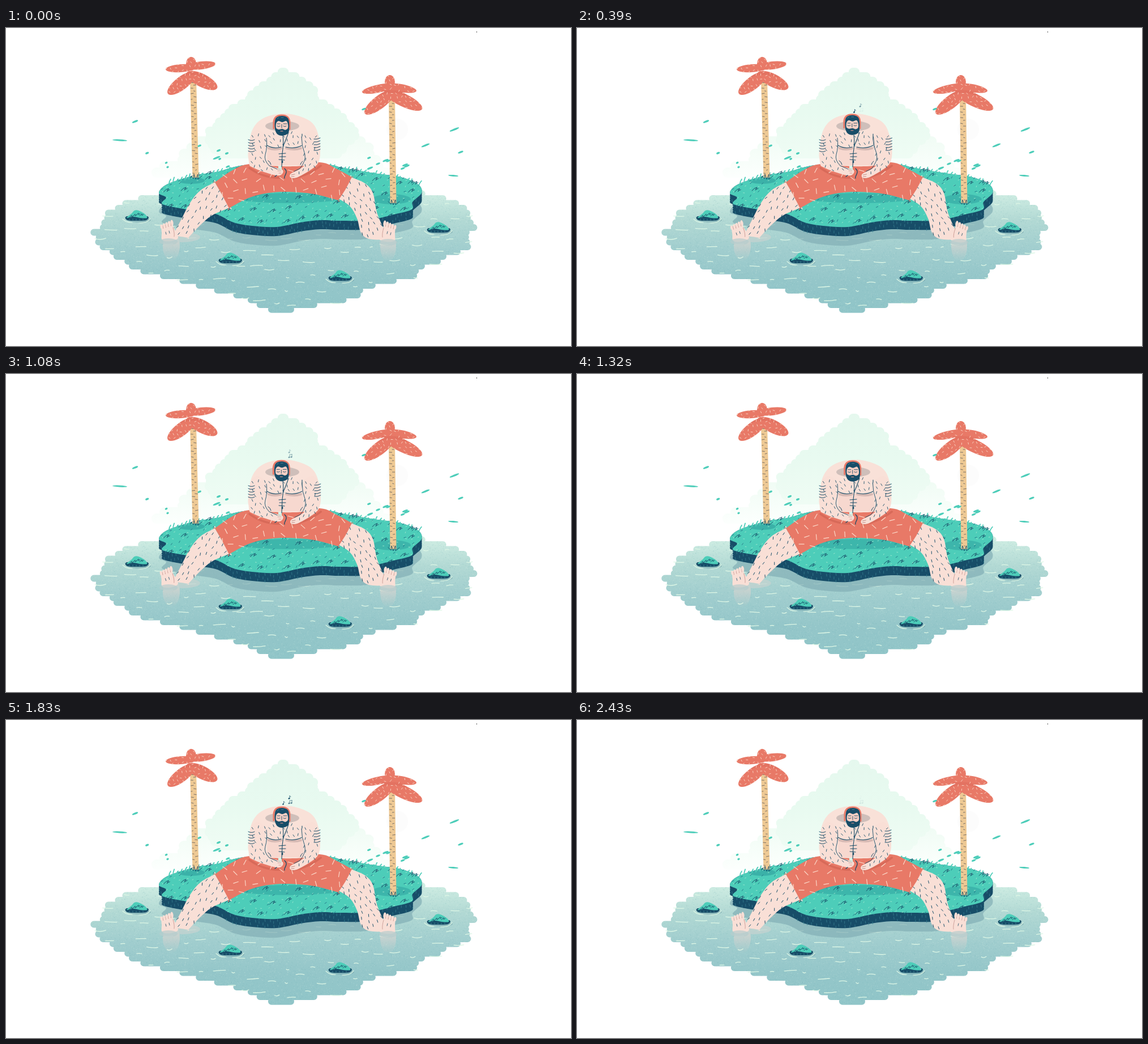
Write an HTML page with a canvas that moves like this. It is 998 px wide and 561 px high and loops after 2460 ms.

```html
<!DOCTYPE html>
<html lang="en">
<head>
<meta charset="utf-8">
<title>Island beat</title>
<style>
  html, body { margin: 0; width: 100%; height: 100%; overflow: hidden; background: #fff; }
  canvas { display: block; width: 998px; height: 561px; }
</style>
</head>
<body>
<canvas id="stage" width="998" height="561"></canvas>
<script>
const LOOP = 2460, STEP = 30, BEAT = LOOP / 4, SONG = LOOP / 2;
const NAVY = '#174d68', GREEN = '#4dcdb9', CORAL = '#e87967', SKIN = '#f9dfd6', FOAM = '#dcf6e5';
const stage = document.getElementById('stage');
const c = stage.getContext('2d');
c.lineCap = c.lineJoin = 'round';

let seed = 7;
const rand = (a = 0, b = 1) => {
  seed = (seed * 1664525 + 1013904223) >>> 0;
  return a + (b - a) * seed / 4294967296;
};
const mix = (a, b, k) => a + (b - a) * k;
const fill = (path, color) => { c.fillStyle = color; c.fill(path); };
const line = (path, color = NAVY, width = 1.1) => {
  c.strokeStyle = color;
  c.lineWidth = width;
  c.stroke(typeof path === 'string' ? new Path2D(path) : path);
};
const ellipse = (x, y, rx, ry, angle = 0) => {
  const p = new Path2D();
  p.ellipse(x, y, rx, ry, angle, 0, 7);
  return p;
};
const oval = (x, y, rx, ry, color, angle) => fill(ellipse(x, y, rx, ry, angle), color);
const fade = (y0, y1, ...colors) => {
  const g = c.createLinearGradient(0, y0, 0, y1);
  colors.forEach((color, i) => g.addColorStop(i / (colors.length - 1), color));
  return g;
};
const inside = (path, draw) => {
  c.save();
  c.clip(path);
  draw();
  c.restore();
};

// Closed spline through the points; a repeated point makes a corner.
const soft = text => {
  const pts = text.split(' ').map(s => s.split(',').map(Number)), n = pts.length;
  const p = new Path2D();
  p.moveTo(...pts[0]);
  pts.forEach((b, i) => {
    const a = pts[(i + n - 1) % n], d = pts[(i + 1) % n], e = pts[(i + 2) % n];
    p.bezierCurveTo(b[0] + (d[0] - a[0]) / 6, b[1] + (d[1] - a[1]) / 6,
      d[0] - (e[0] - b[0]) / 6, d[1] - (e[1] - b[1]) / 6, ...d);
  });
  return p;
};

// Stack of round-ended bars between key rows [y, left, right].
const bars = (keys, step, size, wobble) => {
  const p = new Path2D();
  for (let y = keys[0][0], i = 0; y <= keys.at(-1)[0]; y += step) {
    while (y > keys[i + 1][0]) i++;
    const [a, b] = [keys[i], keys[i + 1]], k = (y - a[0]) / (b[0] - a[0]);
    const left = mix(a[1], b[1], k) + rand(-.3, 1) * wobble, right = mix(a[2], b[2], k) - rand(-.3, 1) * wobble;
    p.roundRect(left, y - size / 2, right - left, size, size / 2);
  }
  return p;
};

// Marks spread evenly over an area, at least a gap apart.
const scatter = (area, [x0, y0, x1, y1], gap, mark) => {
  const path = new Path2D(), seen = [];
  for (let i = 0; i < 2500; i++) {
    const x = rand(x0, x1), y = rand(y0, y1);
    if (!c.isPointInPath(area, x, y) || seen.some(s => Math.hypot(s[0] - x, s[1] - y) < gap)) continue;
    seen.push([x, y]);
    mark(path, x, y);
  }
  return path;
};
const dash = (length, angle, spread) => (p, x, y) => {
  const a = angle + rand(-spread, spread), dx = Math.cos(a) * length / 2, dy = Math.sin(a) * length / 2;
  p.moveTo(x - dx, y - dy);
  p.lineTo(x + dx, y + dy);
};
const ripple = (p, x, y) => {
  const r = rand(2, 11);
  p.moveTo(x - r, y);
  p.quadraticCurveTo(x, y + rand(-2, 3), x + r, y + rand(-1.5, 1));
};
const tuft = (p, x, y) => {
  p.moveTo(x - 5, y + 3);
  p.quadraticCurveTo(x - 1, y - 2, x + 4, y - 3);
  p.lineTo(x + 1, y + 2);
  p.quadraticCurveTo(x + 3, y, x + 6, y - 1);
};

function drawCloud() {
  fill(bars([[200, 335, 640], [225, 305, 655], [262, 245, 700]], 11, 18, 12), fade(195, 262, '#f1fcf5', '#fcfffd'));
  fill(bars([[78, 478, 502], [92, 458, 532], [106, 437, 550], [128, 418, 555], [138, 398, 580], [158, 376, 602],
    [185, 348, 627], [200, 348, 615], [225, 370, 590]], 8, 16, 5), fade(70, 228, '#e5f8ee', '#e8faf0', '#effcf4'));
  oval(691, 179, 19, 19, '#fcfcfc');
}

function drawWater() {
  const water = bars([[284, 300, 715], [301, 232, 780], [318, 183, 822], [343, 166, 835], [362, 150, 826], [388, 166, 824],
    [408, 195, 775], [422, 217, 742], [436, 265, 729], [458, 350, 641], [478, 420, 615], [498, 464, 504]], 8.5, 12, 10);
  fill(water, fade(285, 500, '#d3f0e5', '#b2d9d4', '#a0cdce', '#94c6c9', '#90c5c8'));
  inside(water, () => {
    for (let i = 0; i < 13000; i++) {
      c.fillStyle = rand() < .55 ? '#d9f0e74d' : '#5ca3aa30';
      c.fillRect(rand(150, 836), 285 + rand() ** 1.5 * 215, 1, 1);
    }
  });
  line(scatter(water, [160, 305, 825, 492], 23, ripple), FOAM, 1.3);
}

function drawIsland() {
  const top = soft('270,291 284,276 330,261 372,254 430,241 555,240 597,247 650,256 697,263 728,276 734,291 718,307 ' +
    '717,320 685,329 640,339 590,340 555,339 520,343 478,351 435,349 402,343 370,328 325,321 277,311 283,299');
  const lowered = dy => {
    const p = new Path2D();
    p.addPath(top, new DOMMatrix([1, 0, 0, 1, 0, dy]));
    return p;
  };
  fill(lowered(33), '#82afb5b0');
  const cliff = new Path2D();
  for (let dy = 0; dy <= 16; dy += 4) cliff.addPath(lowered(dy));
  fill(cliff, NAVY);
  line(scatter(cliff, [270, 295, 732, 366], 6, dash(4, 1.5, .15)), '#3d8796', .7);
  fill(top, GREEN);
  inside(top, () => {
    oval(500, 300, 92, 9, '#2f9f9e80');
    oval(327, 269, 24, 6, '#2b969880');
    oval(681, 302, 34, 9, '#2b969870');
  });
  line(scatter(top, [275, 250, 730, 345], 9, dash(2, -.4, .8)), '#a1ead1', .9);
  line(scatter(top, [275, 250, 730, 345], 14, dash(3.5, -.7, .5)), '#247d8b', 1);
  line(scatter(top, [280, 258, 725, 342], 24, tuft), NAVY, 1);
  const blades = new Path2D(), shoots = new Path2D();
  for (let x = 288; x < 730; x += 7) {
    const y = 243 + ((x - 500) / 220) ** 2 * 30;
    blades.moveTo(x, y + 4);
    blades.quadraticCurveTo(x, y, x + rand(2, 6), y - rand(0, 6));
    if (rand() < .3) tuft(shoots, x, y);
  }
  line(blades, GREEN, 1.8);
  line(shoots, NAVY, .9);
}

function drawRock(x, y) {
  c.save();
  c.translate(x, y);
  oval(5, 7, 20, 4, '#75a5ad90');
  line('M-25,5Q-18,12 -8,11M4,12Q20,12 24,4', FOAM, 1.1);
  fill(soft('-17,0 -17,7 0,8 17,7 18,0'), NAVY);
  fill(soft('-18,3 -9,-5 -4,-10 3,-10 14,-4 18,3 6,3 -6,1'), GREEN);
  for (let i = -13; i < 14; i += 6) {
    line(`M${i},5v2`, '#579ba7', .7);
    if (i < 10) line(`M${i},${Math.abs(i) / 3 - 2}l4,-4 0,3 3,-2`, NAVY, .9);
  }
  c.restore();
}

// The crown is a bud and two side leaves over two broad lower ones.
function drawPalm(x, y, footX, footY, tips) {
  const topY = y + 30;
  fill(new Path2D(`M${x - 2},${topY}h11L${footX + 5.5},${footY}h-11Z`), '#eec994');
  const rings = new Path2D();
  for (let h = topY + 6, i = 0; h < footY - 3; h += 5, i++) {
    rings.moveTo(mix(x - 1, footX - 5, (h - topY) / (footY - topY)) + i % 2 * 5, h);
    rings.lineTo(mix(x - 1, footX - 5, (h - topY) / (footY - topY)) + i % 2 * 5 + rand(2, 5), h + rand(-1, 1));
  }
  line(rings, '#6b655f', .9);
  const crown = ellipse(x, y + 3, 9, 12);
  tips.forEach(([dx, dy], i) => {
    const low = i > 1, sx = -.17 * dx, sy = low ? 19 : 9;
    crown.addPath(ellipse(x + (sx + dx) / 2, y + (sy + dy) / 2, Math.hypot(dx - sx, dy - sy) / 2,
      low ? 11.5 : 7, Math.atan2(dy - sy, dx - sx)));
  });
  fill(crown, CORAL);
  inside(crown, () => line(`M${x - 26},${y + 27}Q${x},${y + 14} ${x + 28},${y + 25}`, '#d4635550', 5));
  line(scatter(crown, [x - 50, y - 8, x + 60, y + 62], 6.5, dash(3, .3, 1.5)), '#fbd9c8', .9);
  line(`M${footX - 9},${footY - 3}l5,5 1,-8 3,9 4,-9 0,9 7,-6`, NAVY, .9);
}

function drawLegs() {
  oval(292, 385, 15, 26, fade(362, 411, '#ead5d0cc', '#ead5d000'));
  oval(675, 385, 14, 27, fade(364, 412, '#ead5d0cc', '#ead5d000'));
  oval(310, 369, 33, 9, '#c4d3d1c0');
  const left = soft('369,272 369,272 344,286 326,307 311,335 295,366 295,366 322,370 322,370 344,347 365,330 395,317 395,317');
  const right = soft('609,263 609,263 634,274 648,291 655,325 669,360 669,372 641,372 627,361 620,336 607,314 585,300 585,300');
  [[left, 2, [297, 276, 390, 365]], [right, 1.1, [590, 270, 666, 367]]].forEach(([leg, angle, box]) => {
    fill(leg, SKIN);
    line(scatter(leg, box, 9.5, dash(4.5, angle, .5)), NAVY, 1);
  });
  line('M373,276Q388,292 396,315M606,268Q596,285 587,298', '#d9aaa080', 4);
}

function drawShorts() {
  const shorts = soft('430,240 400,251 369,272 369,272 381,293 394,318 394,318 428,300 463,291 500,289 544,293 ' +
    '587,304 587,304 600,284 611,263 611,263 585,249 555,237 490,241');
  fill(shorts, CORAL);
  inside(shorts, () => line('M430,247Q455,265 484,264M505,265Q530,262 556,243', '#cf6152a0', 4));
  line(scatter(shorts, [380, 250, 602, 306], 15, dash(9, .7, 1.4)), '#fbd8c8', 1.2);
}

const hatch = (x, y, side) => {
  for (let i = 0; i < 5; i++) line(`M${x},${y + i * 5}q${side * 6},3 ${side * 11},${1 - side}`, NAVY, 1);
};

function drawTorso() {
  fill(soft('429,208 436,178 455,159 490,151 525,158 546,174 555,208 550,232 525,243 465,243 431,235'), '#f9e1d8');
  oval(488, 173, 30, 9, '#cfbfba');
  fill(new Path2D('M461,211H524L526,242H462Z'), '#f7d8cf');
  line('M464,212Q475,216 486,212M495,212Q510,216 521,212', '#d6b9b3', 4);
  line(scatter(ellipse(491, 196, 29, 13), [462, 183, 520, 209], 7.5, dash(4, 1.3, .7)), NAVY, .9);
  line('M461,207Q473,214 486,210M494,210Q510,214 523,207M523,187Q522,205 528,220');
  line('M482,222l12,-1M483,227l11,0M482,232l10,1M463,234q4,2 5,7M524,235q-3,2 -4,6', NAVY, 1);
  const arm = soft('445,180 432,192 429,236 438,247 472,259 486,259 488,250 465,243 457,234 460,195');
  fill(arm, SKIN);
  line('M460,194Q462,210 458,223Q455,233 465,243L479,249', NAVY, .9);
  hatch(428, 197, 1);
  line(scatter(arm, [434, 188, 470, 253], 8.5, dash(4, 1.1, .8)), NAVY, .9);
  c.fillStyle = '#d7f3e8';
  c.fillRect(481, 243, 6, 8);
  line('M480,249h5M480,252h6M482,256h4', '#c98f86', .8);
  line('M489,189Q491,202 488,221L487,245M499,184Q494,199 490,207');
  oval(488, 236, 1.4, 2.5, NAVY);
  line('M492,248q5,4 2,10t-2,7M478,260l-3,2', NAVY, 1.4);
}

const rightArm = soft('540,180 552,192 555,216 553,234 544,246 516,263 503,264 503,257 520,248 528,236 522,195');
const rightHair = scatter(rightArm, [517, 188, 550, 256], 8.5, dash(4, 1.8, .8));

function drawRightArm(beat) {
  c.save();
  c.translate(1.8 * beat, 0);
  fill(rightArm, SKIN);
  line('M522,192Q522,208 528,223Q530,235 519,248L509,253', NAVY, .9);
  hatch(555, 194, -1);
  line(rightHair, NAVY, .9);
  line('M504,259l6,-1M504,262h5', '#b9857f', .9);
  c.restore();
}

function drawHead(beat) {
  c.save();
  c.translate(-1.4 * beat, -1.4 * beat);
  line('M473,177V166Q474,154 487,154Q500,154 501,166V178', CORAL, 3);
  fill(soft('475,164 479,157 488,155 497,158 500,166 499,180 487,189 476,180'), NAVY);
  fill(soft('477,169 481,164 488,166 495,164 498,170 497,178 487,181 478,178'), '#f6cfc4');
  fill(soft('475,177 482,179 488,178 494,180 500,177 498,186 488,190 479,187'), NAVY);
  line('M479,169h5M490,169h6M479,173q2,2 5,0M490,173q3,2 5,0M487,170v6', NAVY, .9);
  line('M485,182h4', '#ef9d90', 1);
  line('M479,160l3,-2M486,158h4', '#5c92a2', .7);
  c.restore();
}

function drawFoot(x, y, side, beat) {
  c.save();
  c.translate(x, y);
  c.scale(side, 1);
  c.rotate(.085 * beat);
  fill(soft('-4,-2 4,-20 8,-27 24,-24 25,-10 24,2 10,4'), SKIN);
  for (let i = 0; i < 5; i++) {
    oval(7 + i * 4.6, -28 + i * 1.6, 2.6 - i * .15, 5.5 - i * .4, SKIN, .1);
    if (i < 4) line(`M${9.4 + i * 4.6},${-28 + i * 1.5}l-1,5`, '#c4928c', .8);
  }
  line('M5,-20Q2,-10 3,-4', '#c4928c', .8);
  line('M12,-14l-1,4M18,-12l-1,4', NAVY, .8);
  c.restore();
  oval(x + side * 13, y + 5, 16, 6, '#b5cdcdb0');
}

// Opacity ramps up over a..b, holds to d, and is gone at e.
const pulse = (t, a, b, d, e) => Math.max(0, Math.min(1, (t - a) / (b - a), (e - t) / (e - d)));

function drawNotes(t) {
  const note = (x, y, tail) => {
    oval(x - 1, y + 2, 1.6, 1.2, NAVY, -.3);
    line(`M${x},${y + 2}v-5${tail}`, NAVY, .8);
  };
  c.save();
  c.globalAlpha = pulse(t, 150, 330, 550, 900);
  note(490.5, 146.5, 'l2,2');
  c.globalAlpha = pulse(t, 270, 500, 850, 1210);
  note(501, 136.5, 'l2,2');
  c.globalAlpha = pulse(t, 375, 700, 950, 1225);
  note(501, 145, 'h4');
  note(505, 144.5, '');
  c.restore();
}

function drawLeaflets() {
  const leaflet = (x, y, length) => oval(x, y, length / 2, 1.7, GREEN, -.38);
  [[228, 165, 11], [741, 207, 16], [792, 179, 18], [803, 219, 10], [372, 229, 14], [632, 143, 8]].forEach(l => leaflet(...l));
  for (let i = 0; i < 8; i++) {
    leaflet(rand(240, 400), rand(205, 250), rand(4, 8));
    leaflet(rand(600, 710), rand(226, 252), rand(6, 12));
  }
  oval(201, 198, 13, 1.5, GREEN, .05);
  oval(790, 260.5, 9, 1.4, GREEN, .08);
}

c.fillStyle = '#fff';
c.fillRect(0, 0, 998, 561);
c.fillStyle = '#555';
c.fillRect(831, 6, 1, 2);
drawCloud();
drawWater();
drawIsland();
[[231, 332], [764, 353], [396, 407], [590, 438]].forEach(p => drawRock(...p));
drawPalm(327, 60, 335, 264, [[-45, 13], [43, 3], [-41, 56], [46, 46]]);
drawPalm(678, 92, 684, 309, [[-49, 21], [47, 19], [-44, 59], [57, 51]]);
drawLegs();
drawShorts();
drawTorso();
drawLeaflets();

const scene = document.createElement('canvas');
scene.width = 998;
scene.height = 561;
scene.getContext('2d').drawImage(stage, 0, 0);

function play() {
  const t = Math.floor(performance.now() / STEP) * STEP % LOOP;
  const beat = Math.sin(Math.PI * t / BEAT) ** 2;
  c.drawImage(scene, 0, 0);
  drawFoot(300, 372, -1, beat);
  drawFoot(662, 373, 1, beat);
  drawRightArm(beat);
  drawHead(beat);
  drawNotes(t % SONG);
  requestAnimationFrame(play);
}
play();
</script>
</body>
</html>
```
